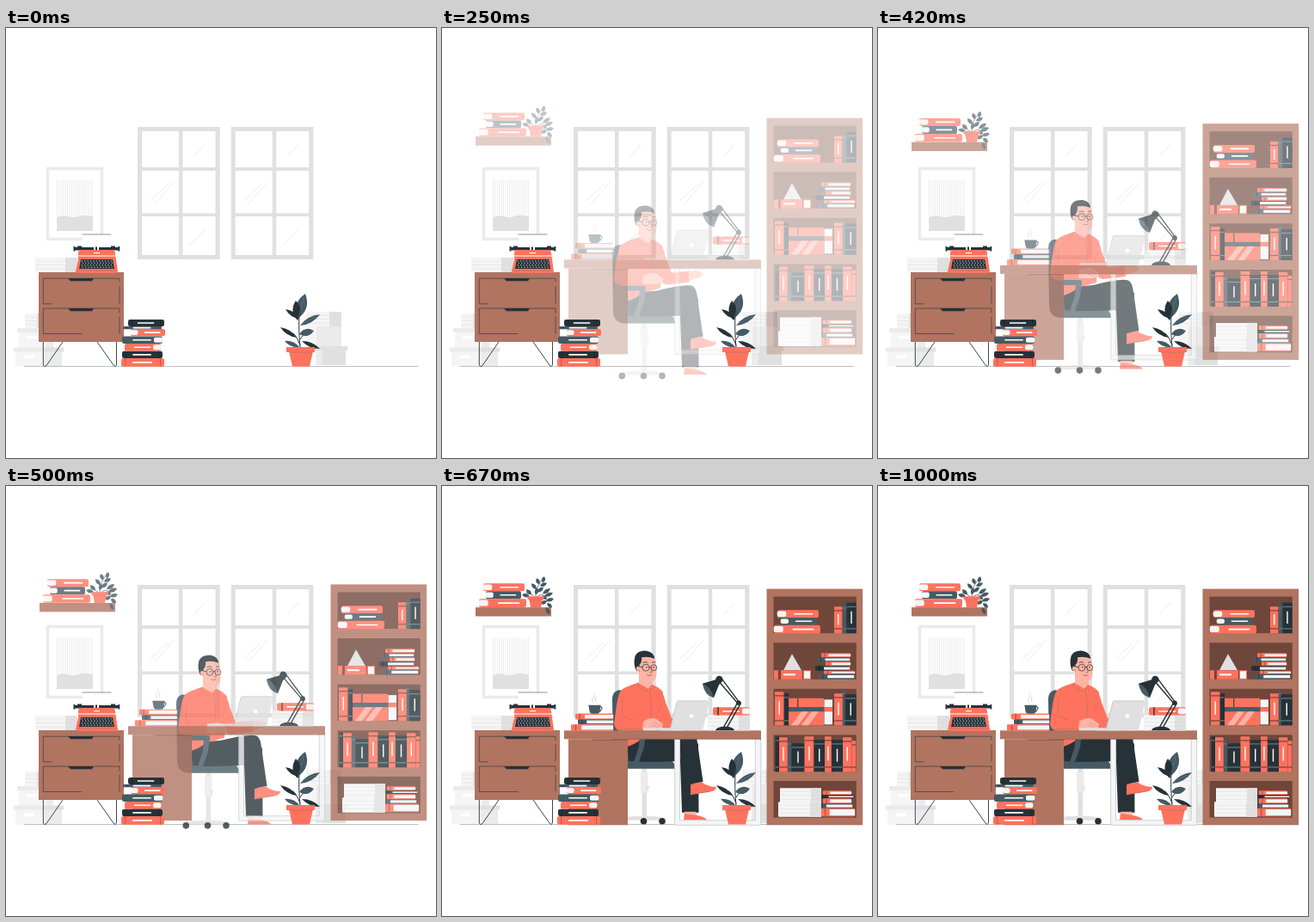
Write an HTML page that moves like this. It is 500x500 px and loops after 1.04 s.

```html
<!DOCTYPE html>
<html lang="en">
<head>
<meta charset="utf-8">
<title>Home office</title>
<style>
html, body { margin: 0; width: 100%; height: 100%; overflow: hidden; background: #fff; }
svg { display: block; width: 100%; height: 100%; }
</style>
</head>
<body>
<svg id="stage" viewBox="0 0 500 500"></svg>
<script>
const CORAL = '#ff725e', DARK = '#263238', SLATE = '#455a64', WOOD = '#b07461', DEEP = '#6f463a',
  SKIN = '#ffb4a5', WHITE = '#fff', G1 = '#f5f5f5', G2 = '#ebebeb', G3 = '#e0e0e0', G4 = '#c7c7c7';

const rect = (x, y, w, h, fill, r = 0) =>
  `<rect x="${x}" y="${y}" width="${w}" height="${h}" rx="${r}" fill="${fill}"/>`;
const shape = (d, fill) => `<path d="${d}" fill="${fill}"/>`;
const line = (d, color, w = 0.7) =>
  `<path d="${d}" fill="none" stroke="${color}" stroke-width="${w}" stroke-linecap="round" stroke-linejoin="round"/>`;
const dot = (x, y, r, fill) => `<circle cx="${x}" cy="${y}" r="${r}" fill="${fill}"/>`;
const each = (list, fn) => list.map(a => fn(...a)).join('');

// Leaf from its base to its tip, bulging w to both sides
function leaf(x, y, tx, ty, w, fill) {
  const len = Math.hypot(tx - x, ty - y), mx = (x + tx) / 2, my = (y + ty) / 2;
  const nx = (ty - y) / len * w, ny = (x - tx) / len * w;
  return shape(`M${x} ${y}Q${mx + nx} ${my + ny} ${tx} ${ty}Q${mx - nx} ${my - ny} ${x} ${y}`, fill);
}

// Lying book; pages show at the left (-1), the right (1) or nowhere (0)
function lying(x, y, w, h, fill, pages = 0) {
  let s = rect(x, y, w, h, fill, Math.min(2.2, h / 3));
  const p = Math.min(11, w * 0.22);
  if (pages) s += rect(pages < 0 ? x - 0.3 : x + w - p + 0.3, y + 1.3, p, h - 2.6, G1, 2);
  else s += rect(x + 4, y, 1.2, h, '#0003') + rect(x + w - 5, y, 1.2, h, '#0003');
  return s + rect(x + w * (pages < 0 ? 0.4 : 0.26), y + h / 2 - 0.8, w * 0.46, 1.6, WHITE, 0.4);
}

// Lying book seen from its long page edge, with the spine at the left
const pageEdge = (x, y, w, h, fill) =>
  rect(x, y, w, h, fill, 1.2) + rect(x + w * 0.25, y + 1.2, w * 0.75 + 0.2, h - 2.4, G1) +
  rect(x + w * 0.1, y, 1.4, h, '#0004');

// Standing book
function standing(x, y, w, h, fill) {
  const band = fill === CORAL ? DEEP : '#607d8b';
  return rect(x, y, w, h, fill, 0.5) + rect(x, y + 4, w, 1.2, band) + rect(x, y + h - 6, w, 1.2, band) +
    (w > 7 ? rect(x + w / 2 - 0.7, y + h * 0.28, 1.4, h * 0.4, WHITE) : '') +
    rect(x + w - 0.6, y, 0.6, h, '#0003');
}

// Archive box with a front and a darker side
const box = (x, y, w, h, split) =>
  rect(x + 2, y + 4, w - 4, h - 4, G1) + rect(x + split, y + 4, w - split - 2, h - 4, G2) +
  rect(x, y, split, 5, G2) + rect(x + split, y, w - split, 5, G3) +
  rect(x + split / 2 - 6, y + 9, 12, 3.5, WHITE, 1);

function papers(x, y, w, h, split) {
  let s = rect(x, y, w, h, G1, 0.8) + rect(x + split, y, w - split, h, G3);
  for (let i = y + 4; i < y + h; i += 4.5) s += line(`M${x + 1} ${i}H${x + w - 1}`, '#d8d8d8', 0.5);
  return s;
}

function windowFrame(x) {
  let s = rect(x, 115, 95.7, 154, G3);
  for (const [y, h] of [[120, 42], [166, 49.5], [219, 45]])
    s += rect(x + 5, y, 43, h, WHITE) + rect(x + 52.5, y, 38, h, WHITE);
  return s + `<g transform="translate(${x})">` +
    line('M66 149L78 136M15 201L35 182M20 205L42 179M60 253L78 235', G2, 0.9) + '</g>';
}

function picture() {
  let s = `<rect x="48.5" y="163.5" width="63" height="82" fill="#fff" stroke="${G2}" stroke-width="3.6"/>`;
  for (let x = 59.5; x < 101; x += 2.4) s += line(`M${x} ${176 + 2 * Math.abs(Math.sin(x))}V219`, G3, 0.6);
  return s + shape('M59 236V220Q66 217 72 219T84 219T94 218T101 219V236Z', G3);
}

function typewriter() {
  let s = rect(89, 240, 33, 20, WHITE) + line('M89 240H122', '#777', 0.8) +
    rect(80, 255, 51, 3.6, DARK, 1) + rect(78.5, 254, 2, 5.5, DARK) + rect(130.3, 254, 2, 5.5, DARK) +
    rect(83, 253.5, 5, 2, DARK) + rect(122, 253.5, 5, 2, DARK) + rect(102, 254, 6, 5, WHITE) + rect(104, 254.5, 2, 4, DARK) +
    shape('M86 258H125Q127 259 127 262L128 269L130 283Q130 285 128 285H83Q81 285 81 283L84 269V262Q84 259 86 258', CORAL) +
    rect(102, 261, 7, 1.2, WHITE) + line('M83.5 265H127.5', WHITE, 1) + shape('M87 269H124L126 280H85Z', DARK);
  for (let r = 0; r < 4; r++)
    for (let k = 0; k < 11; k++) s += dot(88.3 + k * 3.4 + (r % 2), 270.8 + r * 2.5, 0.8, '#a6b1b6');
  return s + line('M83 281.5H128', WOOD, 0.6);
}

function cabinet() {
  return line('M43.3 365V391Q44 395 47 392.5L66 365M106 365L125 392Q128 395 128.5 391V365', DARK, 0.9) +
    rect(38, 284, 99, 81, WOOD) +
    line('M53 320.8H43.3V291.2H132V295M132 301V320M88 355.5H43.3V326H132V331M132 336V355', DARK, 0.6) +
    each([[291], [326]], y => shape(`M72 ${y}H102L100 ${y + 3.2}H75Z`, DARK));
}

const floorBooks = () => each([
  [142, 339, 42, 8, DARK], [136, 347, 45, 3.2, SLATE], [145, 350, 40, 8.3, CORAL, -1],
  [135, 358.5, 47, 8.5, SLATE, 1], [138, 367, 42, 8.6, CORAL, 1], [135, 375.8, 47, 8.2, DARK], [134, 384, 50, 9.7, CORAL]
], lying);

const plant = () =>
  line('M342 372Q340 350 341 333M342 369Q338 358 334 355M342 362Q346 355 350 353', DARK, 1) +
  each([
    [341, 338, 325, 327, 5, DARK], [339, 338, 348, 309, 12, SLATE], [339, 340, 337, 317, 9, DARK],
    [342, 346, 365, 333, 6, SLATE], [338, 360, 319, 348, 5, DARK], [341, 356, 358, 352, 8, SLATE],
    [341, 371, 324, 364, 5, SLATE], [344, 364, 365, 373, 5, DARK]
  ], leaf) +
  line('M340 337L346 314M343 345L361 335', '#788a92', 0.4) +
  shape('M329 376H357L353 393.5H333Z', CORAL) + rect(326, 371, 33, 6, CORAL, 0.5) + line('M330 377H356', WOOD, 0.8);

const backdrop = () =>
  windowFrame(153) + windowFrame(261.7) + picture() +
  papers(34, 267, 49, 17, 35) + papers(22, 332, 17, 18, 14) +
  box(13, 349, 44, 23, 34) + box(9, 371.5, 58, 22, 36) +
  papers(349, 330, 41, 17, 27) + rect(350, 347, 40, 24, G1) + rect(361, 347, 29, 24, G2) +
  rect(357, 370, 40, 5, G3) + rect(360, 375, 35, 17, G2) + rect(368, 375, 27, 17, G3) +
  line('M21 393.5H479', '#b5b9bb', 0.9);

const foreground = () => cabinet() + typewriter() + floorBooks() + plant();

const wallShelf = () =>
  rect(39, 140.8, 88, 10.4, WOOD) +
  each([[48, 113, 48, 9, CORAL, -1], [51, 122, 41, 9, SLATE, -1], [43, 131, 55, 9.6, CORAL, -1]], lying) +
  line('M109 130Q108 118 117 108M109 130Q103 124 98 124M109 130Q118 120 123 134', DARK, 0.6) +
  each([
    [117, 112, 119, 105], [113, 114, 110, 107], [114, 116, 122, 112.5], [110, 120, 104, 113],
    [111, 123, 118, 117.5], [104, 126, 98, 120], [102, 128, 93, 126], [109, 126, 111, 118], [117, 125, 126, 119],
    [119, 128, 129, 124], [116, 128, 122, 131], [121, 133, 130, 131], [122, 133, 115, 137], [122, 136, 128, 141], [121, 141, 125, 149]
  ], (x, y, tx, ty) => leaf(x, y, tx, ty, 4.4, SLATE)) +
  shape('M101 130H117L115 141H103Z', CORAL) + rect(99.5, 128, 19.5, 3.5, CORAL) + line('M101 132H117', WOOD, 0.6);

function bookcase() {
  let s = rect(377.5, 119.3, 111.7, 274.7, WOOD);
  for (let i = 0; i < 5; i++) s += rect(385.5, 128.3 + i * 53.6, 96.3, 42.6, DEEP);
  s += each([
    [390, 144, 48, 9, CORAL, -1], [394, 153, 42, 8, SLATE, -1], [386, 161.5, 54, 9.6, CORAL, -1]
  ], lying);
  s += each([
    [441, 194, 34, 5, CORAL], [436, 199, 38, 5, SLATE], [446, 204, 29, 5, CORAL],
    [434, 209, 40, 5.5, DARK], [444, 214.5, 36, 4, CORAL], [438, 218.5, 41, 5.7, SLATE],
    [443, 354, 33, 5, CORAL], [440, 359, 38, 4, DARK], [443, 363, 33, 6, CORAL],
    [437, 369, 40, 5.5, SLATE], [441, 374.5, 39, 9.5, CORAL]
  ], pageEdge);
  s += each([
    [456, 140, 9.5, 31, CORAL], [466, 137, 4.5, 34, SLATE], [470.5, 135.5, 11, 35.5, DARK],
    [387, 239, 10.5, 39, CORAL], [398, 241, 5, 37, DARK],
    [456, 241, 10, 37, CORAL], [466, 236, 3, 42, SLATE], [469, 242, 12.5, 36, DARK],
    [387.5, 291, 4.5, 41, DARK], [392, 292, 10, 40, CORAL], [402, 295, 4.5, 37, SLATE], [406.5, 299, 15, 33, DARK],
    [421.5, 291, 11, 41, CORAL], [432.5, 295, 12.5, 37, DARK], [445, 291, 8, 41, CORAL],
    [453, 295, 13, 37, DARK], [466, 292, 10.5, 40, CORAL], [476.5, 296, 5, 36, CORAL]
  ], standing);
  return s +
    shape('M407 195L418 214H397Z', G3) + rect(386, 214, 33, 10.5, CORAL) + rect(391, 214, 3, 10.5, DEEP) +
    rect(397, 218, 14, 2, WHITE) + rect(420, 214, 9, 10.5, CORAL) + rect(421, 215, 7, 8.5, G1) +
    rect(403, 246.5, 41, 10.5, CORAL) + rect(413, 246.5, 1.5, 10.5, DEEP) +
    rect(404, 257, 40, 5, SLATE) + rect(403, 262, 41, 16, CORAL) +
    shape('M418 262H426L414 278H406ZM430 262H438L426 278H418Z', '#ffb0a4') +
    rect(444.5, 248, 9.5, 9, G1) + rect(444.5, 257, 9.5, 5, CORAL) + rect(444.5, 262, 9.5, 15, G1) +
    papers(393, 351, 48, 17, 36) + papers(391, 367, 50, 17.5, 37);
}

const chair = () =>
  rect(232.5, 329, 5.5, 55, G3) + rect(231, 333, 8.5, 24, G2) + line('M238 354L240 350', G3, 2) +
  shape('M209 386Q218 384 235 384T257 386V389H209Z', G3) +
  each([[209.3], [234.5], [256]], x => dot(x, 390, 3.8, DARK)) +
  shape('M204 238Q211 236 214 246L220 318H262Q271 319 271 329H214Q200 329 199 316L198 248Q198 240 204 238', SLATE);

const person = () => chair() +
  // far leg, near leg and shoes
  shape('M220 300L282 293L298 300L298.5 380H279L277 320Q240 322 217 320Z', DARK) +
  shape('M282 379H295L297 384H282Z', SKIN) + shape('M282 381L294 383Q305 384 308 388.5H281Z', CORAL) +
  shape('M291 338H302L304 348L292 349Z', SKIN) +
  shape('M289 347L302 345Q312 351 319 350Q319 355 311 356L289 359.5Z', CORAL) + line('M289 358.5L311 355.5', WOOD, 0.6) +
  shape('M215 294L250 291Q285 282 292 286Q296 289 297 299L303.5 344L289 347L278 316Q250 322 217 320Z', DARK) +
  line('M278 318L276 305', SLATE, 0.7) +
  // far arm
  shape('M250 236Q257 237 260 252L267 270L288 268V281L262 284Q254 284 252 270Z', CORAL) +
  shape('M287 269Q296 265 304 271Q302 276 294 277L287 280Z', SKIN) +
  // neck and torso
  shape('M229 216H245V232Q237 240 229 232Z', SKIN) +
  shape('M228 229Q212 234 208 238Q204 244 202 262L200 277Q201 284 208 285L216 286V303Q226 300 232 294L254 288L256 262L257 240Q252 234 244 231L240 236Z', CORAL) +
  line('M228 229L226 233L237 239L241 235L246 237M241 236Q244 252 243 270M210 249L209 268M222 272L209 268M256 252L252 262M204 283H232', WOOD, 0.6) +
  each([[242.5, 245], [243.5, 255], [243, 265]], (x, y) => dot(x, y, 0.6, WOOD)) +
  // arm rest
  rect(214, 285, 23, 6, SLATE, 2.5) + shape('M230 288H237L235 304L229 321H223L229 303Z', SLATE) +
  // near hand
  shape('M234 274Q242 269 249 271L257 277Q257 282 250 283H233Z', SKIN) + line('M246 275L254 279M244 278L251 281', WOOD, 0.4) +
  // head
  shape('M228 202Q236 195 247 199Q251 212 249 222Q247 229 240 228Q230 226 228 214Z', SKIN) +
  shape('M247 201Q247 194 238 192Q228 191 224.5 198Q222 208 226 215L230 215.5L229.5 208Q232.5 206 232 199.5Q240 198 247 201', DARK) +
  dot(228.5, 212.5, 2.6, SKIN) +
  `<g fill="none" stroke="${DARK}" stroke-width=".7"><circle cx="237" cy="211.5" r="4"/><circle cx="246.3" cy="211.5" r="3.4"/></g>` +
  line('M241 211Q242 210 243 211M233 211L228.5 210M234 205.5Q236.5 204 239 205.5M244.5 205.5L247.5 205', DARK, 0.8) +
  dot(237.8, 211, 0.8, DARK) + dot(246, 211, 0.8, DARK) +
  line('M243 212L244.5 216.5L242 217M238.5 220Q241 222 244 220', '#8f4a3e', 0.7);

const lamp = () =>
  line('M327.5 280L343.5 252L322 227M331 281L347 253L325.5 224', DARK, 1.4) + dot(345, 252, 2.8, DARK) +
  shape('M318 284Q319 279.5 329 279.5T340 284Z', DARK) +
  shape('M303 229.5L318 225Q319 220 323 220.5Q328 222 326 227L322 231L316 246Q306 241 303 229.5', DARK) +
  shape('M303 229.5Q313 233 316 246Q305 243 303 229.5', SLATE);

const desk = () =>
  shape('M270.5 294H277V388.5H364V294H371V394H270.5Z', G1) +
  line('M270.7 294V394H370.7V294M276.5 294V388.5H364.3V294', '#c3c7c9', 0.8) +
  rect(147, 294, 69, 100, WOOD) + line('M174 294.8H216', DEEP, 0.8) +
  rect(142, 284, 229, 10, WOOD) + line('M216 294H371', '#945f4f', 0.7) +
  each([[155, 264.5, 44, 6.7, CORAL], [158, 271, 41, 6, SLATE], [150, 277, 49, 7.2, CORAL]], pageEdge) +
  shape('M170.3 254.5H184.7L183.5 261.5Q183 264.5 180 264.5H175Q172 264.5 171.5 261.5Z', SLATE) +
  line('M184.5 256.5Q188 257 183.5 262', SLATE, 1.2) +
  line('M176 252Q173 249 176 246T176 241M179 251Q177 248 179 245', G4, 0.7) +
  papers(309, 266, 49, 18, 36) + lying(315, 257, 43, 9.3, CORAL, 1) + rect(320, 257, 2, 9.3, DEEP) +
  lamp() +
  shape('M234 281H302V284H234Z', G3) +
  shape('M275 249.5H308Q311 249.5 310.5 252L303 284H265L273 251Q273.5 249.5 275 249.5', G3) +
  line('M265 284L273 251Q273.5 249.6 275 249.6H308', G4, 0.9) + dot(290, 267, 2.4, WHITE);

const stage = document.getElementById('stage');
stage.innerHTML = backdrop() + `<g class="down">${bookcase()}${wallShelf()}</g>` +
  `<g class="up">${person()}</g><g class="down">${desk()}</g>` + foreground();
const movers = [...stage.querySelectorAll('g.down, g.up')];

const LOOP = 1040, TICK = 1000 / 24, SETTLE = 15;

function draw(now) {
  const n = Math.min(24, Math.floor((now % LOOP + 5.1) / TICK));
  const fade = Math.max(0, Math.min(1, (n - 1) / (SETTLE - 1)));
  // Linear entrance, then a slight overshoot and return
  const shift = n < SETTLE ? 1.62 * (n - SETTLE) : Math.sin(Math.PI * (n - SETTLE) / 10);
  for (const g of movers) {
    g.setAttribute('opacity', fade);
    g.setAttribute('transform', `translate(0 ${g.matches('.down') ? shift : -shift})`);
  }
}

const start = performance.now();
function loop() {
  draw(performance.now() - start);
  requestAnimationFrame(loop);
}
loop();
</script>
</body>
</html>
```
